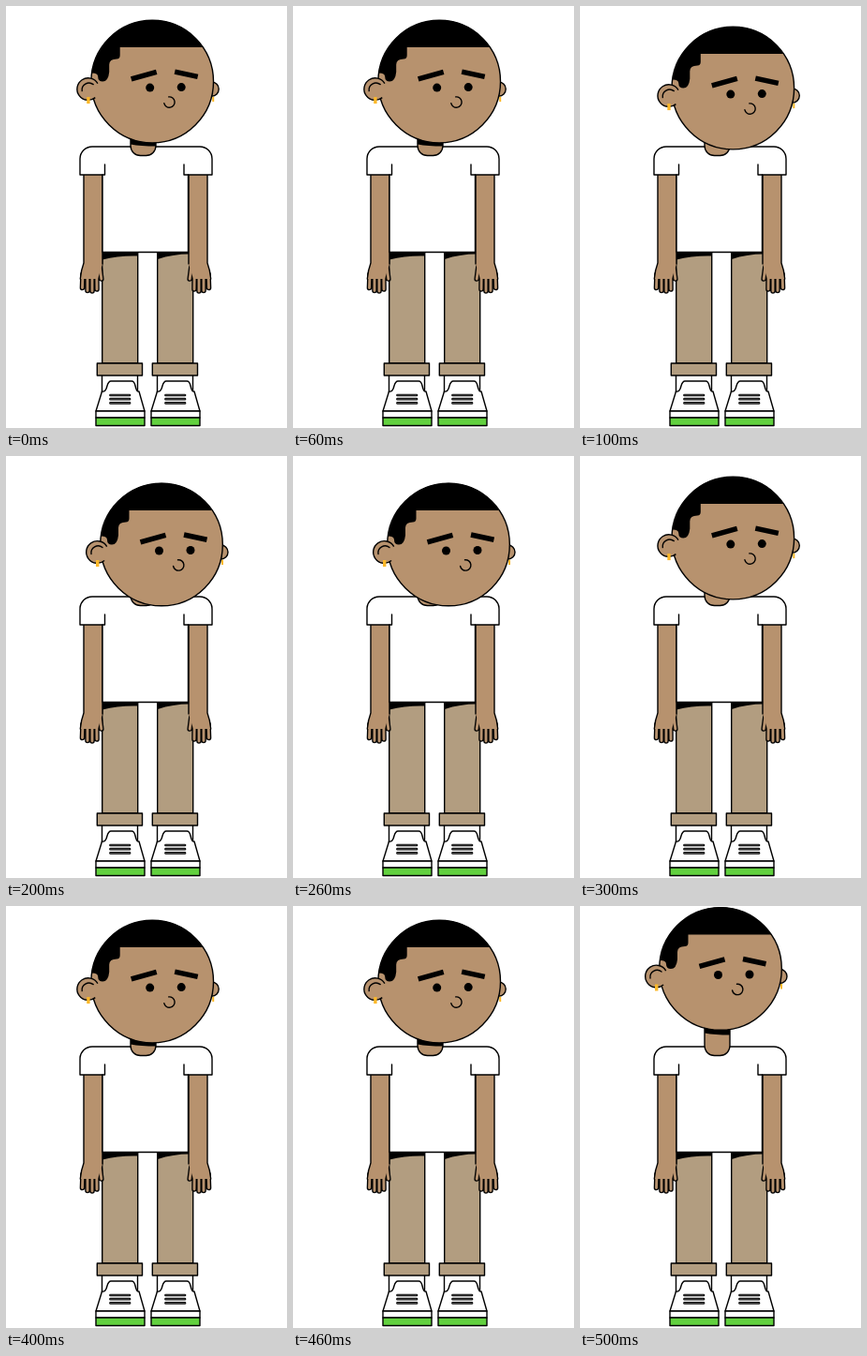
Recreate the animation shown at these times as an HTML page. Size 300 px wide and 450 px high, loop 600 ms.

```html
<!DOCTYPE html>
<html lang="en">
<head>
<meta charset="utf-8">
<title>Nodding man</title>
<style>
  html, body { margin: 0; width: 100%; height: 100%; overflow: hidden; background: #fff; }
  svg { display: block; width: 100%; height: 100%; }
  .skin { fill: #b7926e; }
  .cloth { fill: #b29d80; }
  .white { fill: #fff; }
  .ink { fill: #000; stroke: none; }
  .line { fill: none; }
  .gold { fill: #fbb829; stroke: none; }
</style>
</head>
<body>
<svg viewBox="0 0 300 450" stroke="#000" stroke-width="1.4" stroke-linejoin="round" stroke-linecap="round">
  <defs>
    <path id="fingers" d="M82 286L81.500 300.500M87 286V303.500M92 286V304M96.800 286L97 302M100 277L101.800 291"/>
    <path id="laces" d="M111.500 415H132M111.500 419.200H132M111.500 423.400H132"/>
    <g id="leg">
      <path class="white" d="M102.500 390V412H140.500V390"/>
      <path class="cloth" d="M102.700 262.500H140.700V381H102.700Z"/>
      <path class="cloth" d="M97.300 381H145.500V394H97.300Z"/>
      <path class="white" d="M96 432L102.500 411Q106.500 412 108 405Q109.500 400 112 400H134Q137 400 138 405Q139.500 412 142 411L148 432Z"/>
      <use href="#laces" stroke-width="2.700"/>
      <use href="#laces" stroke-width=".7" stroke="#777"/>
      <path class="white" d="M96 432H148V439H96Z"/>
      <path fill="#62d13f" d="M96 439H148V447.500H96Z"/>
    </g>
    <g id="arm">
      <use href="#fingers" stroke-width="5.600"/>
      <use href="#fingers" stroke-width="2.900" stroke="#b7926e"/>
      <path class="skin" stroke="none" d="M83 175V274Q80 282 79.300 291H98L103 275V175Z"/>
      <path class="line" d="M83 175V274Q80 282 79.300 291M103 275V175"/>
    </g>
    <clipPath id="neckClip"><path d="M133 60H160V152H133Z"/></clipPath>
  </defs>

  <use href="#leg"/>
  <use href="#leg" x="59"/>
  <path class="ink" d="M103 262H140.500V266.500Q120 266 103 270.500Z"/>
  <path class="ink" d="M162 262H196V264.500Q178 264.500 162 270Z"/>
  <use href="#arm"/>
  <use href="#arm" transform="matrix(-1 0 0 1 298 0)"/>

  <path class="white" d="M79 180V163A13 13 0 0 1 92 150H207A13 13 0 0 1 220 163V180H194.500V262.500H103V180Z"/>
  <path class="line" d="M103 180H105.500V169M194.500 180H190V169"/>

  <path class="skin" d="M133 105V149A10.500 10.500 0 0 0 143.500 159.500H149.500A10.500 10.500 0 0 0 160 149V105"/>
  <g clip-path="url(#neckClip)">
    <path id="shade" class="ink" d="M133 40H160V70.500Q144 70.500 133 68.500Z"/>
  </g>

  <g id="head">
    <path class="gold" d="M64 16h2v5.500h-2z"/>
    <circle class="skin" cx="63.500" cy="8" r="7.500"/>
    <circle class="skin" r="65.300"/>
    <path class="ink" d="M-64.500 -10A65.300 65.300 0 0 1 54.500 -36.500H-34.500V-28Q-34.500 -24 -38 -24Q-46 -24 -46 -18V-10Q-47 0 -53 0Q-58 0 -58 -5Q-58 -9 -64.500 -9Z"/>
    <path class="skin" d="M-58.300 2.100A11.800 11.800 0 1 0 -60.900 17" stroke-linecap="butt"/>
    <path class="line" d="M-75 10A7.500 7.500 0 0 1 -63 3"/>
    <path class="gold" d="M-70 16.500h3.400v7h-3.400z"/>
    <path class="line" stroke-width="5.500" stroke-linecap="butt" d="M-22.500 -2.700L4.500 -10.200M24 -10.500L48.500 -5.200"/>
    <circle class="ink" cx="-2.500" cy="6.500" r="4.500"/>
    <circle class="ink" cx="31" cy="6" r="4.500"/>
    <path class="line" d="M17.500 16.300A5.700 5.700 0 1 1 12.600 23"/>
  </g>
</svg>
<script>
  // Head centre from the lowest pose to the highest
  const poses = [[166, 94.5], [163.3, 87.6], [156.2, 80.6], [150, 67]];
  const head = document.getElementById('head');
  const shade = document.getElementById('shade');

  function draw(now) {
    const step = Math.floor(now / 100) % 6;
    const [x, y] = poses[Math.abs(step - 2)];
    head.setAttribute('transform', `translate(${x} ${y})`);
    // The chin hides the neck shadow once the head is low
    shade.setAttribute('transform', `translate(0 ${Math.min(y, 79)})`);
    shade.setAttribute('visibility', y < 84 ? 'visible' : 'hidden');
  }

  const start = performance.now();
  function tick() {
    draw(performance.now() - start);
    requestAnimationFrame(tick);
  }
  tick();
</script>
</body>
</html>
```
